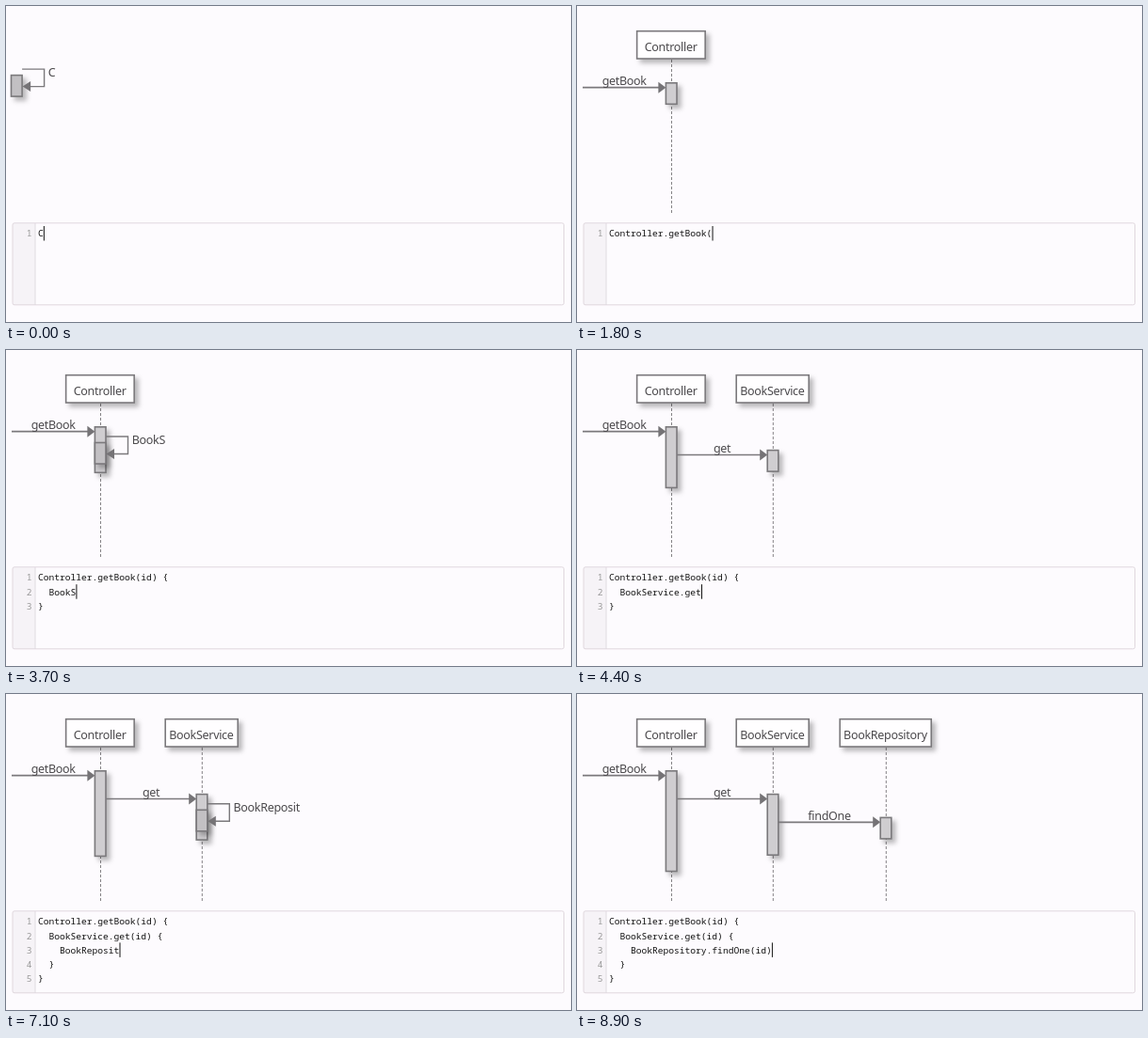
Recreate the animation shown at these times as an HTML page. Size 600 by 336 pixels, loop 9 s.

```html
<!DOCTYPE html>
<html lang="en">
<head>
<meta charset="utf-8">
<title>Sequence diagram from code</title>
<style>
html, body { margin: 0; width: 100%; height: 100%; overflow: hidden; background: #fdfbfe; }
svg { display: block; width: 600px; height: 336px; }
text { white-space: pre; }
.label { font: 12.5px "Noto Sans", "Open Sans", sans-serif; letter-spacing: -.3px; fill: #4b494c; }
.code, .num { font: 9.6px "Noto Sans Mono", "DejaVu Sans Mono", monospace; fill: #111; }
.num { fill: #999; text-anchor: end; }
.mid { text-anchor: middle; }
.box { stroke: #7b797c; stroke-width: 1.6; }
.shade { filter: drop-shadow(4px 4px 2.5px #0004); }
.line { fill: none; stroke: #7b797c; stroke-width: 1.7; }
.self { stroke-width: 1.4; }
.life { stroke: #858386; stroke-dasharray: 3 2; }
.head { fill: #757376; }
</style>
</head>
<body>
<svg viewBox="0 0 600 336">
  <rect x="7" y="230.8" width="585.5" height="87" rx="2" fill="#fdfbfe"/>
  <path d="M7 231H31V318H7Z" fill="#f6f3f7"/>
  <path d="M31 231V318" stroke="#dfdbe0"/>
  <rect x="7" y="230.8" width="585.5" height="87" rx="2" fill="none" stroke="#e0d8de"/>
  <g id="scene"></g>
</svg>
<script>
const LOOP = 9000, STEP = 100;

// Keystrokes: start time, then one chunk per 100 ms
const typing = [
  [0, "C|o|n|t|ro|ll|er|."],
  [1100, "g|e|t|B|o|o|k|(||i|d|)| |{"],
  [2700, "\n  "],
  [3300, "B|o|o|k|S|e|r|v|ic|e|.g|et|("],
  [4700, "id)"],
  [4900, " ||{"],
  [5400, "\n  "],
  [5800, "  |B|o||o||k"],
  [6600, "R|e|p|os|i|t|o|ry"],
  [7500, ".|f|i|n|d|O|n|e|(||i|d|)"]
];
const keys = typing.flatMap(([start, chunks]) =>
  chunks.split("|").map((chars, i) => [start + i * STEP, chars]));
const cursorOff = [[700, 1100], [8700, 8900]];

const lanes = [{ x: 100.2, w: 72.5 }, { x: 208, w: 77 }, { x: 328, w: 97 }];
const HALF = 5.8;

const text = (x, y, s, cls) => `<text x="${x}" y="${y}" class="${cls}">${s}</text>`;
const rect = (x, y, w, h, fill, cls = "") =>
  `<rect x="${x}" y="${y}" width="${w}" height="${h}" fill="${fill}" class="box ${cls}"/>`;
const path = (d, cls) => `<path d="${d}" class="${cls}"/>`;
const bar = (x, y, h, fill = "#cfcdd0") => rect(x - HALF, y, 2 * HALF, h, fill, "shade");
const laneY = i => 81.8 + 24.8 * i;

function selfCall(x, y, name) {
  const left = x + HALF, right = x + 29.3, low = y + 12;
  return bar(x, y, 22.5, "#c2c0c3") +
    path(`M${left} ${y - 6.5}H${right}V${low}H${left + 7}`, "line self") +
    path(`M${left + .5} ${low}l8.5 -5.5v11z`, "head") +
    text(x + 33.5, y + 1.2, name, "label");
}

function message(from, to, y, name) {
  return path(`M${from} ${y}H${to - 6}`, "line") +
    path(`M${to} ${y}l-8 -6v12z`, "head") +
    text((from + to) / 2, y - 2.7, name, "label mid");
}

function diagram(code) {
  const calls = code.split("\n").map(s => s.match(/(\w+)\.?(\w*)/)).filter(Boolean);
  const made = calls.filter(c => c[2]);
  const pending = calls.find(c => !c[2]);
  const last = made.length - 1;
  if (last < 0) return selfCall(11.3, 73.6, pending[1]);

  let out = "";
  made.forEach(([, name], i) => {
    const { x, w } = lanes[i];
    out += path(`M${x + .3} 57V222`, "life") +
      rect(x - w / 2 - .3, 26.7, w, 29.3, "#fffeff", "shade") +
      text(x - .6, 48.2, name, "label mid");
  });
  let end = laneY(last) + (pending ? 48.5 : 22.5);
  for (let i = last; i >= 0; i--, end += 17.3)
    out += bar(lanes[i].x, laneY(i), end - laneY(i));
  made.forEach(([, , method], i) => {
    const from = i ? lanes[i - 1].x + HALF : 6;
    out += message(from, lanes[i].x - HALF, laneY(i) + 4.9, method);
  });
  if (pending) out += selfCall(lanes[last].x, laneY(last) + 16.7, pending[1]);
  return out;
}

function editor(code, cursor) {
  const typed = code.split("\n"), row = typed.length - 1;
  const closers = ["}", "  }"].slice(0, row).reverse();
  let out = [...typed, ...closers].map((line, i) => {
    const y = 245.4 + 15.2 * i;
    return text(27.5, y, i + 1, "num") + text(34, y, line, "code");
  }).join("");
  if (cursor) {
    const x = 34.6 + typed[row].length * 5.76;
    out += path(`M${x} ${234 + 15.2 * row}v15.5`, "caret\" stroke=\"#111");
  }
  return out;
}

const scene = document.getElementById("scene");
let shown = -1;
function draw() {
  const t = Math.floor(performance.now() % LOOP / STEP) * STEP;
  if (t !== shown) {
    shown = t;
    const code = keys.filter(k => k[0] <= t).map(k => k[1]).join("");
    const cursor = !cursorOff.some(([a, b]) => t >= a && t < b);
    scene.innerHTML = diagram(code) + editor(code, cursor);
  }
  requestAnimationFrame(draw);
}
draw();
</script>
</body>
</html>
```
